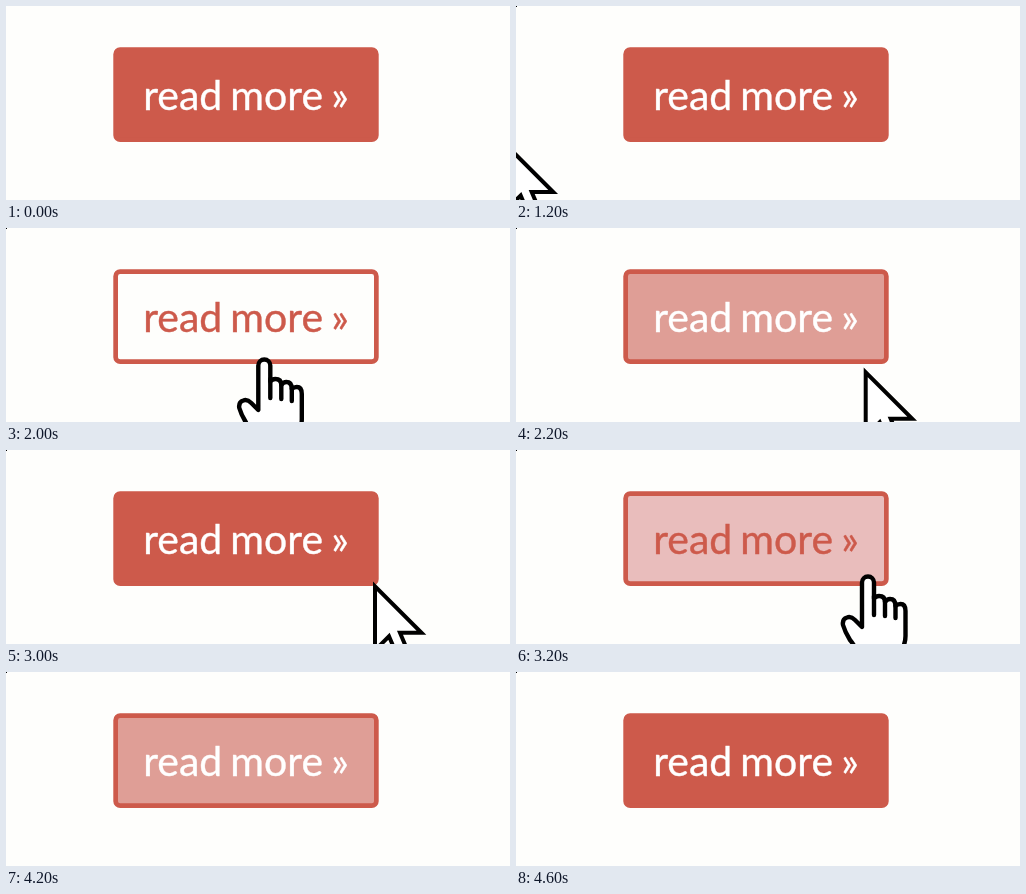
Write an HTML page that moves like this. It is 504 px wide and 194 px high and loops after 5200 ms.

```html
<!DOCTYPE html>
<html lang="en">
<head>
<meta charset="utf-8">
<style>
  html, body { margin: 0; height: 100%; overflow: hidden; background: #fefefc; }
  svg { display: block; width: 504px; height: 194px; }
  text { font: 41px Lato, sans-serif; word-spacing: -2.4px; text-anchor: middle; stroke-width: .4; }
  #arrow, #hand { fill: #fff; stroke: #000; stroke-width: 4; }
  #hand { stroke-width: 4.4; stroke-linecap: round; stroke-linejoin: round; }
</style>
</head>
<body>
<svg viewBox="0 0 504 194">
  <rect id="button" x="109.65" y="43.65" width="260.7" height="90" rx="4.5" stroke="#cd5a4b" stroke-width="4.7"/>
  <text id="label" x="240" y="104">read more »</text>
  <path id="arrow" stroke-miterlimit="10" d="M0 0V64L14 50L24 73.5L35 70L25 46.5H46.5Z"/>
  <g id="hand">
    <path d="M-6 53V8.5a6 6 0 0 1 12 0V24.5q2-2.5 5-2.5q6 0 6 6q2-3 5-3q5.5 0 5.5 7q2-2 5-2q5 0 5 7V62q0 9-6 17V95H-11V80Q-12 73-18 66Q-23 58-25 51Q-26 45-21 43.5Q-17 42-13 46Z"/>
    <path fill="none" d="M6 22V41M17 27V42M27.5 31V44"/>
  </g>
  <rect id="dot" width="1" height="1"/>
</svg>
<script>
const LOOP = 5200, STEP = 200;
const RED = '#cd5a4b', ROSE = '#df9e96', PINK = '#e9bdbc', PALE = '#fcf3f1', CLEAR = '#fefefc';

// start time, button fill, cursor, cursor x, cursor y
const poses = [
  [0, RED],
  [1200, RED, 'arrow', -9.3, 139.5],
  [1400, PINK, 'hand', 174.5, 116],
  [1600, PALE, 'hand', 200, 114],
  [1800, CLEAR, 'hand', 226.5, 117],
  [2000, CLEAR, 'hand', 258.3, 129],
  [2200, ROSE, 'arrow', 349.7, 144.3],
  [2400, RED, 'arrow', 375.7, 139.5],
  [3000, RED, 'arrow', 369, 136.3],
  [3200, PINK, 'hand', 352, 124],
  [3400, CLEAR, 'hand', 353, 122],
  [3600, CLEAR, 'hand', 355.3, 121.5],
  [3800, CLEAR, 'hand', 354.5, 121],
  [4200, ROSE],
  [4400, RED]
];

const el = id => document.getElementById(id);
const show = (id, on) => el(id).setAttribute('visibility', on ? 'visible' : 'hidden');

function draw(now) {
  const t = Math.floor(now % LOOP / STEP) * STEP;
  const [, fill, cursor, x, y] = poses.findLast(p => p[0] <= t);
  const ink = fill === RED || fill === ROSE ? '#fff' : RED;
  el('button').setAttribute('fill', fill);
  for (const paint of ['fill', 'stroke']) el('label').setAttribute(paint, ink);
  for (const id of ['arrow', 'hand']) show(id, id === cursor);
  if (cursor) el(cursor).setAttribute('transform', `translate(${x} ${y})`);
  show('dot', t >= 400);
}

const start = performance.now();
function tick() {
  draw(performance.now() - start);
  requestAnimationFrame(tick);
}
tick();
</script>
</body>
</html>
```
